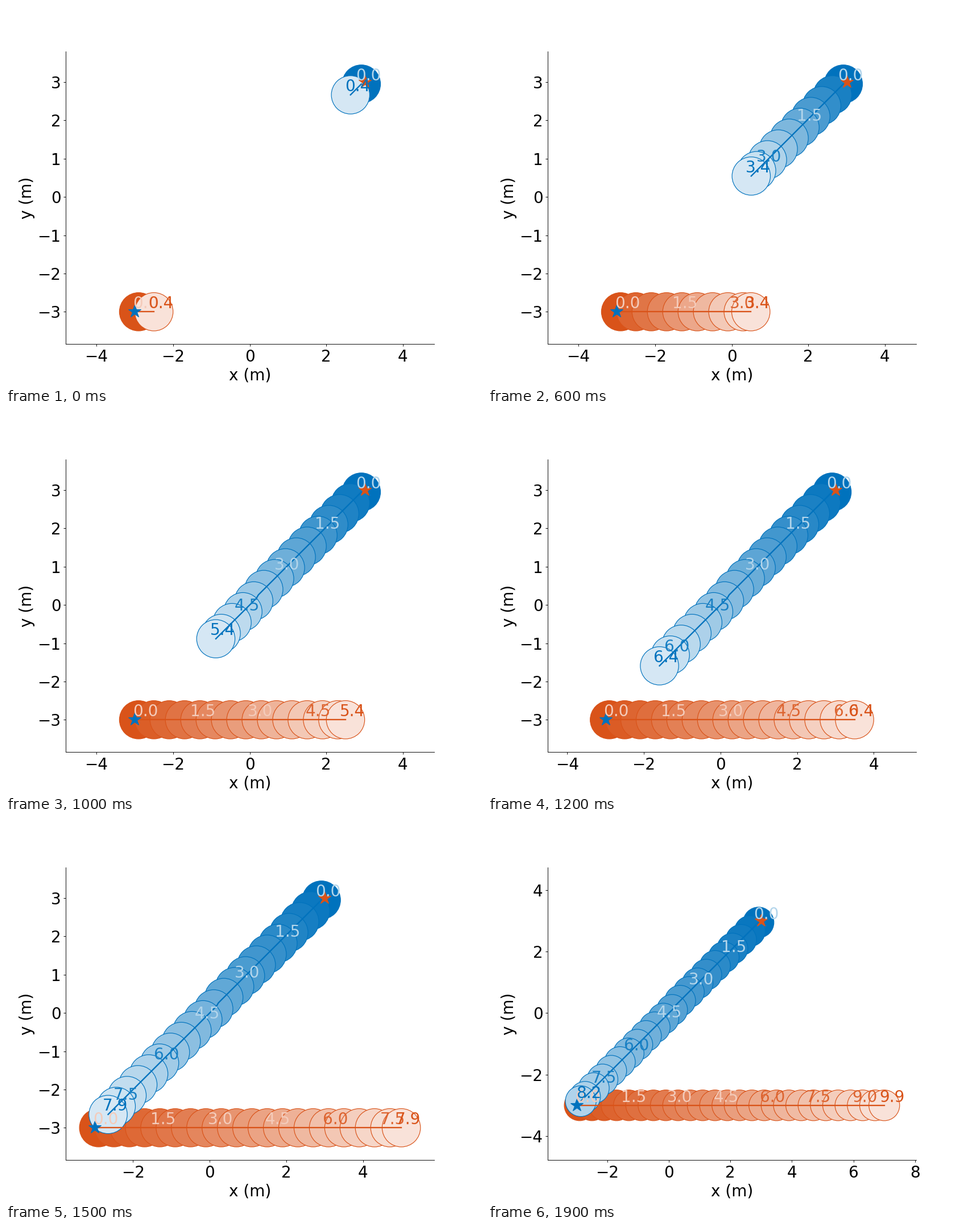
Recreate the animation shown at these times as a matplotlib script. Size 837 px wide and 669 px high, loop 3 s.

```python
import matplotlib.pyplot as plt
import numpy as np
from matplotlib.animation import FuncAnimation

WIDTH, HEIGHT, DPI = 837, 669, 83.7
DT = 0.1            # seconds per simulation step
RADIUS = 0.5
FADE = 1.2          # how far past the current time the fade reaches
CIRCLE_STEP, TEXT_STEP = 4, 15
LAST_UPDATE = 19

ORANGE = np.array([0.85, 0.325, 0.098])
BLUE = np.array([0.0, 0.447, 0.741])

plt.rcParams.update({
    "font.family": "DejaVu Sans",
    "font.size": 24,
    "axes.spines.top": False,
    "axes.spines.right": False,
})


def walk(start, headings):
    """Positions after each unit-speed step along the given headings (degrees)."""
    angles = np.radians(headings)
    steps = DT * np.column_stack([np.cos(angles), np.sin(angles)])
    return np.array(start) + np.cumsum(steps, axis=0)


# The blue agent heads along the diagonal, with two short 15 degree corrections.
blue_headings = np.full(83, 225.0)
blue_headings[0] = 210
blue_headings[39] = 240

AGENTS = [
    (ORANGE, walk((-3, -3), np.zeros(100)), (3, 3)),
    (BLUE, walk((3, 3), blue_headings), (-3, -3)),
]

fig, ax = plt.subplots(figsize=((WIDTH + 1e-6) / DPI, (HEIGHT + 1e-6) / DPI), dpi=DPI)


def tint(color, alpha):
    """Blend a colour over white."""
    return 1 - alpha * (1 - color)


def draw_label(pos, step, color):
    ax.text(pos[0] - 0.15, pos[1] + 0.1, f"{step * DT:.1f}", color=color)


def draw_agent(color, path, goal, now):
    end = min(now, len(path) - 1)
    ax.plot(*path[:end + 1].T, color=color, lw=2)
    ax.plot(*goal, color=color, marker="*", markersize=20)

    for step in [*range(0, end, CIRCLE_STEP), end]:
        fill = tint(color, 1 - step / (FADE * now))
        ax.add_patch(plt.Circle(path[step], RADIUS, fc=fill, ec=color))

    for step in range(0, end, TEXT_STEP):
        alpha = 0.3 if step / (FADE * now) < 0.5 else 0.9
        draw_label(path[step], step, tint(color, alpha))
    draw_label(path[end], end, color)


def update(frame):
    now = 4 + 5 * min(frame, LAST_UPDATE)
    ax.clear()
    for color, path, goal in AGENTS:
        draw_agent(color, path, goal, now)
    ax.set_xlabel("x (m)")
    ax.set_ylabel("y (m)")
    ax.axis("equal")
    return []


anim = FuncAnimation(fig, update, frames=30, interval=100,
                     init_func=lambda: update(0), repeat=True, repeat_delay=0)
plt.show()
```
